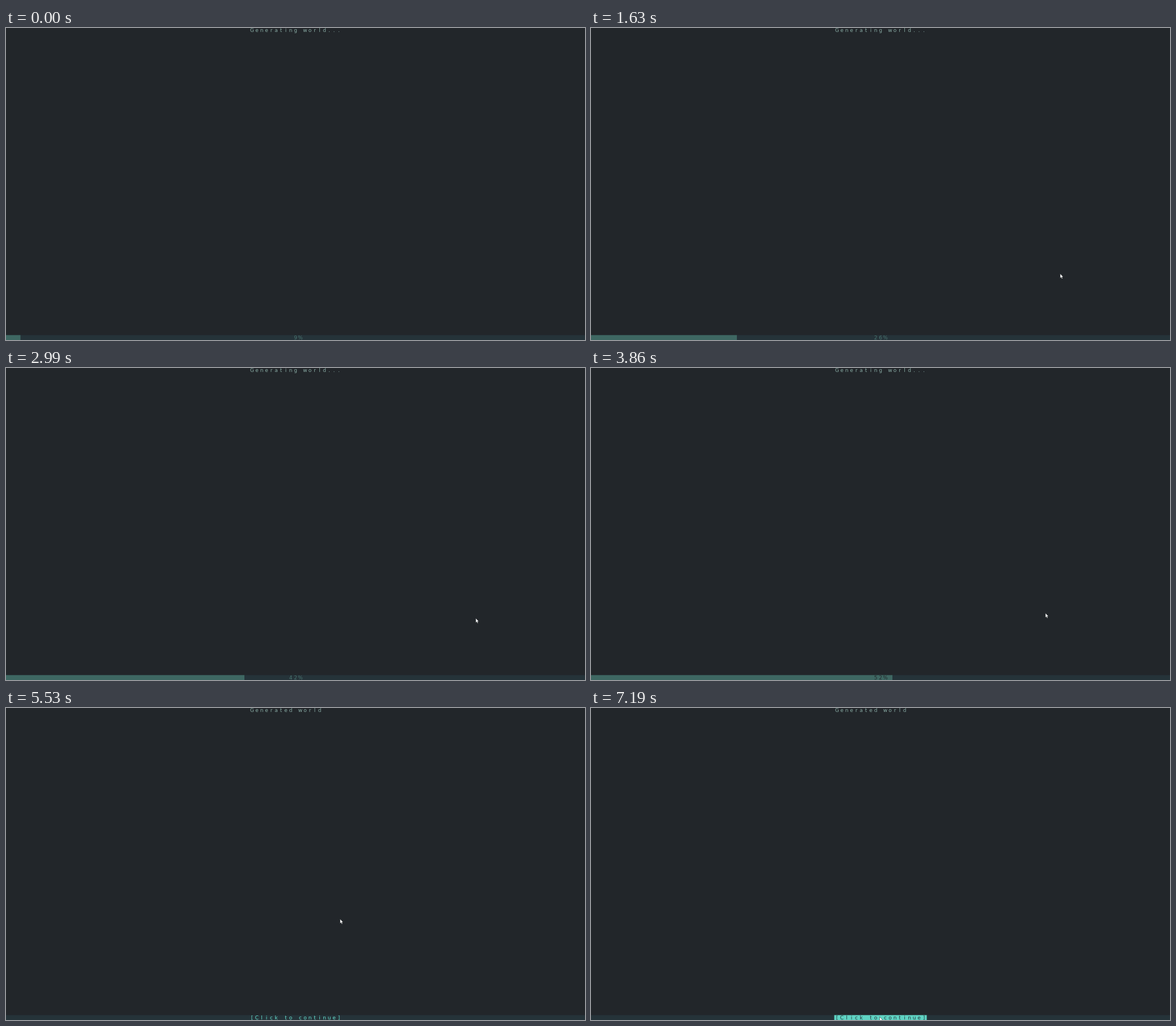
Write an HTML page that moves like this. It is 1020x549 px and loops after 8 s.

```html
<!DOCTYPE html>
<html lang="en">
<head>
<meta charset="utf-8">
<title>Generating world</title>
<style>
  html, body { margin: 0; width: 100%; height: 100%; overflow: hidden; background: #22262a; }
  svg { display: block; width: 1020px; height: 549px; }
  text { font: 9px "DejaVu Sans", sans-serif; text-anchor: middle; white-space: pre; }
  #title { fill: #8aada6; }
  #under { fill: #4a7470; }
  #over { fill: #22292d; }
  #button { fill: #68e2d1; }
  #plate { fill: none; }
  .hover #plate { fill: #5fd3c3; }
  .hover #button { fill: #22343a; }
</style>
</head>
<body>
<svg id="stage" viewBox="0 0 1020 549">
  <clipPath id="done"><rect id="clip" y="540" height="9"/></clipPath>
  <text id="title" y="7"></text>
  <rect y="540.4" width="1020" height="8.6" fill="#253339"/>
  <text id="under" y="548"></text>
  <rect id="fill" y="540.4" height="8.6" fill="#3e6762"/>
  <g clip-path="url(#done)"><text id="over" y="548"></text></g>
  <rect id="plate" x="428.5" y="540.4" width="163" height="8.6"/>
  <text id="button" y="548"></text>
  <path id="cursor" d="M.5 .3V8.2L2.3 6.6L3.5 9.3L4.9 8.7L3.7 6.1H6Z" fill="#fff" stroke="#15181a" stroke-width=".5"/>
</svg>
<script>
const LOOP = 8000, FIRST = 190, STEP = 110.7;
const CELL = 8.5, WIDTH = 1020;
const ENTER = 5, DONE = 47;
const $ = id => document.getElementById(id);

// Key points: tick, then values
const barKeys = [[0, 25.5], [14, 257], [26, 420], [34, 531], [43, 797], [46, 986]];
const cursorKeys = [
  [5, 906, 492], [8, 826, 432], [24, 826, 432], [26, 827, 440], [34, 800, 431],
  [43, 737, 428], [49, 588, 371], [53, 590, 319], [56, 520, 388], [63, 508, 543]
];

function at(keys, tick) {
  const i = keys.findIndex(key => key[0] >= tick);
  if (i <= 0) return keys.at(i).slice(1);
  const [t0, ...from] = keys[i - 1], [t1, ...to] = keys[i];
  return from.map((v, j) => v + (to[j] - v) * (tick - t0) / (t1 - t0));
}

// Puts one character in each grid cell, in a field centred on the stage
function write(id, string, columns) {
  const left = (WIDTH - columns * CELL) / 2;
  $(id).setAttribute("x", [...string].map((c, i) => left + (i + .5) * CELL).join(" "));
  $(id).textContent = string;
}

function draw(time) {
  const tick = Math.max(0, Math.floor((time - FIRST) / STEP) + 1);
  const done = tick >= DONE;
  const [width] = at(barKeys, tick);
  const [x, y] = at(cursorKeys, tick).map(Math.round);
  const percent = Math.max(9, Math.ceil(width / 10.2 - .1));
  const label = done ? "" : (percent + "%").padStart(3);

  write("title", done ? "Generated world" : "Generating world...", 19);
  write("under", label, 3);
  write("over", label, 3);
  write("button", done ? "[Click to continue]" : "", 19);
  for (const id of ["fill", "clip"]) $(id).setAttribute("width", done ? 0 : width);
  $("stage").classList.toggle("hover", done && y >= 540);
  $("cursor").style.display = tick < ENTER ? "none" : "";
  $("cursor").setAttribute("transform", `translate(${x} ${y})`);
}

const start = performance.now();
function loop(now) {
  draw(Math.max(0, now - start) % LOOP);
  requestAnimationFrame(loop);
}
draw(0);
requestAnimationFrame(loop);
</script>
</body>
</html>
```
